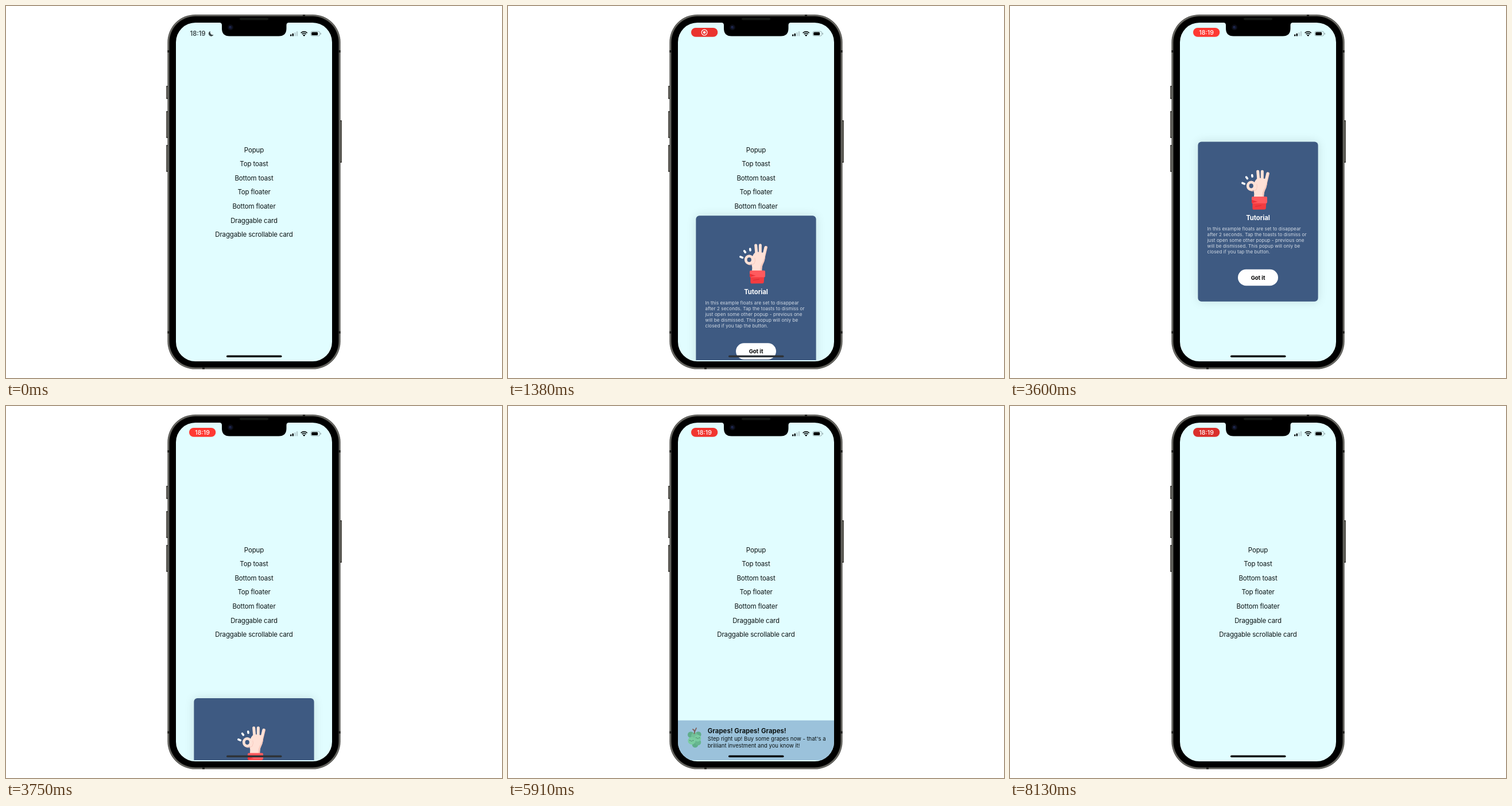
An HTML page with a canvas for the animation above (8.19 s loop, 864 by 648 pixels).

```html
<!DOCTYPE html>
<html lang="en">
<head>
<meta charset="utf-8">
<title>Popup demo</title>
<style>
  html, body { margin: 0; width: 100%; height: 100%; overflow: hidden; background: #fff; }
  canvas { display: block; width: 864px; height: 648px; }
</style>
</head>
<body>
<canvas id="stage"></canvas>
<script>
const W = 864, H = 648, LOOP = 8190;
const canvas = document.getElementById('stage');
const ctx = canvas.getContext('2d');
const dpr = window.devicePixelRatio || 1;
canvas.width = W * dpr;
canvas.height = H * dpr;

const SCREEN = { x: 296, y: 29, w: 272, h: 590, r: 34 };
const HIDDEN = 620;
const BG = '#e1fdff';
const MENU = ['Popup', 'Top toast', 'Bottom toast', 'Top floater',
  'Bottom floater', 'Draggable card', 'Draggable scrollable card'];
const TUTORIAL = ['In this example floats are set to disappear',
  'after 2 seconds. Tap the toasts to dismiss or',
  'just open some other popup - previous one',
  'will be dismissed. This popup will only be',
  'closed if you tap the button.'];

const clamp = v => Math.max(0, Math.min(1, v));
const mix = (a, b, k) => a + (b - a) * k;
const ramp = (t, start, len) => clamp((t - start) / len);

// Unit step response of a damped spring; ms since start
function spring(ms) {
  if (ms <= 0) return 0;
  const s = ms / 1000, w = 2 * Math.PI / 0.55, z = 0.825;
  const q = Math.sqrt(1 - z * z), a = w * q * s;
  return 1 - Math.exp(-z * w * s) * (Math.cos(a) + z / q * Math.sin(a));
}

function slide(t, show, hide, rest) {
  return t < hide ? mix(HIDDEN, rest, spring(t - show)) : mix(rest, HIDDEN, spring(t - hide));
}

function box(x, y, w, h, r, fill) {
  ctx.beginPath();
  ctx.roundRect(x, y, w, h, r);
  if (fill) { ctx.fillStyle = fill; ctx.fill(); }
}

function disc(x, y, r, fill) {
  ctx.beginPath();
  ctx.arc(x, y, r, 0, 7);
  ctx.fillStyle = fill;
  ctx.fill();
}

function stroke(d, color, width) {
  ctx.strokeStyle = color;
  ctx.lineWidth = width;
  ctx.lineCap = ctx.lineJoin = 'round';
  ctx.stroke(new Path2D(d));
}

function shape(d, color) {
  ctx.fillStyle = color;
  ctx.fill(new Path2D(d));
}

function text(str, x, y, size, { weight = 400, color = '#0c1415', align = 'left', gap = 0 } = {}) {
  ctx.font = `${weight} ${size}px Inter, "Liberation Sans", sans-serif`;
  ctx.letterSpacing = gap + 'px';
  ctx.textAlign = align;
  ctx.textBaseline = 'alphabetic';
  ctx.fillStyle = color;
  ctx.fillText(str, x, y);
}

function drawPhone() {
  ctx.fillStyle = '#fff';
  ctx.fillRect(0, 0, W, H);
  for (const [x, y, h] of [[279, 139, 23], [279, 183, 47], [279, 242, 47], [581.8, 199, 74]]) {
    box(x, y, 3.2, h, 1.2, '#3b3a35');
    ctx.fillStyle = '#8d8a83';
    ctx.fillRect(x + 1, y + 2, 1, h - 4);
  }
  // Nested bands of the metal rim
  const rim = (inset, color) =>
    box(281.4 + inset, 14.9 + inset, 301.2 - 2 * inset, 617.7 - 2 * inset, 48.5 - inset, color);
  rim(0, '#3a3a36');
  rim(1, '#8b8a84');
  rim(2.1, '#3a3a36');
  ctx.fillStyle = '#22221f';
  for (const y of [77, 566.5]) {
    ctx.fillRect(281.4, y, 3, 4);
    ctx.fillRect(579.6, y, 3, 4);
  }
  ctx.fillRect(517, 14.9, 4, 3);
  ctx.fillRect(342, 629.6, 4, 3);
  rim(3.4, '#000');
  box(SCREEN.x, SCREEN.y, SCREEN.w, SCREEN.h, SCREEN.r, BG);
}

function drawNotch() {
  shape('M372 28 V29 Q376 29 376 33.500 V39 Q376 52.500 389.500 52.500 H475 Q488.500 52.500 488.500 39 V33.500 Q488.500 29 492.500 29 V28 Z', '#000');
  box(407, 20.5, 50, 4, 2, '#151815');
  disc(391, 37.3, 5, '#0b0d16');
  disc(391, 37.3, 2.8, '#151b38');
  disc(390.3, 36.5, 1, '#303c70');
}

function drawSystemIcons() {
  for (let i = 0; i < 4; i++) {
    const h = 3 + i * 1.85;
    box(495 + i * 3.6, 52.6 - h, 2.4, h, 0.7, i < 2 ? '#050808' : '#b9cfd2');
  }
  ctx.lineCap = 'butt';
  ctx.strokeStyle = '#050808';
  ctx.lineWidth = 1.7;
  for (const r of [7.8, 4.9]) {
    ctx.beginPath();
    ctx.arc(519.2, 52.5, r, -Math.PI * 0.75, -Math.PI * 0.25);
    ctx.stroke();
  }
  ctx.beginPath();
  ctx.moveTo(519.2, 53);
  ctx.arc(519.2, 53, 3.1, -Math.PI * 0.75, -Math.PI * 0.25);
  ctx.fillStyle = '#050808';
  ctx.fill();
  box(530.9, 44.2, 15.8, 8, 2.6);
  ctx.strokeStyle = '#8b9fa1';
  ctx.lineWidth = 0.8;
  ctx.stroke();
  box(532.2, 45.4, 11, 5.6, 1.5, '#050808');
  box(547.7, 46.7, 1.1, 3, 0.6, '#8b9fa1');
}

function drawClock(t) {
  const pill = ramp(t, 90, 200), swap = ramp(t, 3150, 250);
  if (pill < 1) {
    ctx.globalAlpha = 1 - pill;
    text('18:19', 334, 52.4, 11.1, { weight: 600, color: '#3c4749', align: 'center' });
    shape('M355.800 43.800 A4.600 4.600 0 1 0 361.600 50 A4.700 4.700 0 0 1 355.800 43.800 Z', '#3c4749');
  }
  if (pill > 0) {
    const glow = 0.5 + 0.5 * Math.cos((t - 3700) / 1850 * 2 * Math.PI);
    const [r, g, b] = [mix(214, 255, glow), mix(46, 57, glow), mix(42, 50, glow)];
    ctx.globalAlpha = pill;
    box(319, 38, 46.3, 15.8, 7.9, `rgb(${r},${g},${b})`);
    ctx.globalAlpha = pill * (1 - swap);
    ctx.beginPath();
    ctx.arc(342.1, 46, 4.9, 0, 7);
    ctx.strokeStyle = '#fff';
    ctx.lineWidth = 1.2;
    ctx.stroke();
    disc(342.1, 46, 2.3, '#fff');
    ctx.globalAlpha = swap;
    text('18:19', 342.1, 49.8, 10.7, { weight: 500, color: '#fff', align: 'center' });
  }
  ctx.globalAlpha = 1;
}

// Hand icon, in coordinates relative to the card's top left corner
function drawHand() {
  const skin = '#ffe1d6', shade = '#f8c9bd';
  stroke('M77.500 71.800 L81 73.300 M84.200 61.500 L86 64 M94.300 58 L94.700 60.500', '#fff', 3.6);
  stroke('M106 72 L104.300 51.800 M111.800 72 L112 51.600', skin, 5);
  stroke('M117.500 74 L122 55.300', shade, 5);
  stroke('M116.800 74 L121.200 55.300', skin, 4.4);
  shape('M98 72 Q101 63 107 63 L120.500 65 Q121 77 117 84 Q114.500 89 114.800 97 H97.500 Q98.500 90 97 84 Z', skin);
  shape('M120.500 67 Q121 77 117 84 Q114.500 89 114.800 97 H112 Q111.500 88 115 82.500 Q118.500 77 120.500 67 Z', shade);
  ctx.beginPath();
  ctx.ellipse(92.8, 76.8, 6, 6.4, 0, 0, 7);
  ctx.fillStyle = '#3e5a82';
  ctx.fill();
  ctx.strokeStyle = skin;
  ctx.lineWidth = 4.7;
  ctx.stroke();
  stroke('M91 85 Q96 87.500 101.500 83.500', shade, 1);
  stroke('M102.500 74 Q104.500 79 101.500 83.500', shade, 0.9);
  shape('M95 106 H119 L118.300 116 Q118 118 116 118 L97 118.300 Q95 118.300 95 116 Z', '#f33c40');
  box(93.6, 95.5, 27, 11.8, 2, '#ff5a5e');
  shape('M93.600 101 L104 104.500 L93.600 107 Z', '#ec3239');
  stroke('M100 112.500 L110 111', '#d82a33', 1);
}

function drawCard(top) {
  if (top >= HIDDEN - 0.5) return;
  ctx.save();
  ctx.translate(327.4, top);
  ctx.shadowColor = 'rgba(0,0,0,0.12)';
  ctx.shadowBlur = 17 * dpr;
  box(0, 0, 209.2, 278.3, 6, '#3e5a82');
  ctx.shadowColor = 'transparent';
  drawHand();
  text('Tutorial', 104.6, 136.9, 11.3, { weight: 700, color: '#fff', align: 'center', gap: -0.05 });
  TUTORIAL.forEach((line, i) =>
    text(line, 16.1, 154.8 + i * 10, 8.1, { color: '#d3dbe5', gap: 0.09 }));
  box(69.6, 222.2, 70, 28.4, 14.2, '#fff');
  text('Got it', 104.6, 240.1, 9.5, { weight: 700, color: '#000', align: 'center' });
  ctx.restore();
}

function drawGrapes() {
  const berries = [[22.5, 25, 5.5, '#5fae8b'], [35.5, 24.5, 5, '#5fae8b'], [29, 27, 6, '#72bf98'],
    [30, 42, 5.3, '#5fae8b'], [35, 38, 5.3, '#67b68f'], [24, 35.5, 6.6, '#7acca0'], [34.5, 31, 5.8, '#7acca0']];
  for (const [x, y, r, c] of berries) disc(x, y, r, c);
  stroke('M28.500 23 Q30.500 18 26 15.500 M29.500 19 Q31 15.500 32 13.500', '#80605c', 1.9);
  for (const [x, y] of [[23.7, 35], [34.6, 30.3]]) {
    disc(x - 2.8, y, 0.65, '#31574c');
    disc(x + 2.8, y, 0.65, '#31574c');
    stroke(`M${x - 1.2} ${y + 0.8} Q${x} ${y + 2.2} ${x + 1.2} ${y + 0.8}`, '#31574c', 0.6);
  }
}

function drawToast(top) {
  if (top >= HIDDEN - 0.5) return;
  ctx.save();
  ctx.translate(SCREEN.x, top);
  ctx.fillStyle = '#9bc2db';
  ctx.fillRect(0, 0, SCREEN.w, 78);
  drawGrapes();
  text('Grapes! Grapes! Grapes!', 51.8, 22, 11.3, { weight: 700, gap: 0.05 });
  text("Step right up! Buy some grapes now - that's a", 51.8, 35.3, 9.5);
  text('brilliant investment and you know it!', 51.8, 47.2, 9.5);
  ctx.restore();
}

function draw(t) {
  ctx.setTransform(dpr, 0, 0, dpr, 0, 0);
  const cardTop = slide(t, 1227, 3551, 184.8);
  const toastTop = slide(t, 5290, 7280, 548);

  drawPhone();
  ctx.save();
  box(SCREEN.x, SCREEN.y, SCREEN.w, SCREEN.h, SCREEN.r);
  ctx.clip();
  MENU.forEach((label, i) =>
    text(label, 432, 254.9 + i * 24.53, 11.5, { align: 'center', gap: -0.15 }));
  ctx.save();
  ctx.beginPath();
  ctx.rect(SCREEN.x, SCREEN.y, SCREEN.w, 588);
  ctx.clip();
  drawCard(cardTop);
  drawToast(toastTop);
  ctx.restore();
  const covered = cardTop < 608 && cardTop + 278 > 612;
  box(384, 608.5, 96.5, 3.5, 1.75, covered ? '#2f3338' : '#000');
  ctx.restore();

  drawNotch();
  drawClock(t);
  drawSystemIcons();
}

function tick() {
  draw(performance.now() % LOOP);
  requestAnimationFrame(tick);
}
tick();
</script>
</body>
</html>
```
